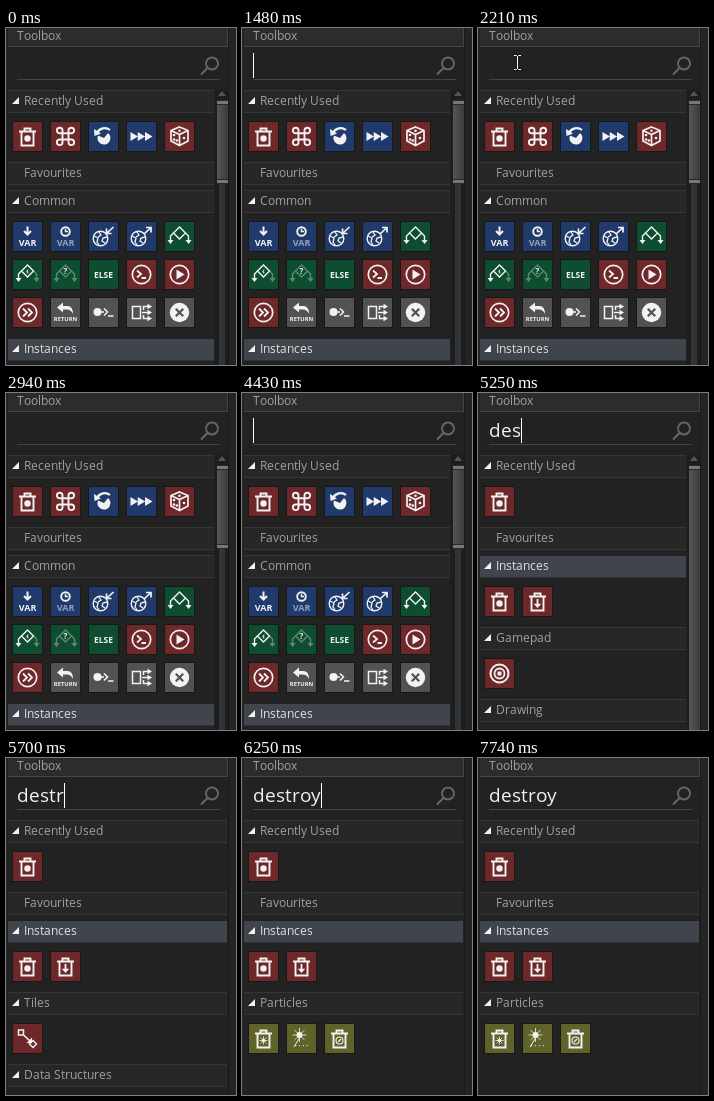
These frames come from a looping animation (230x337 px, 8000 ms). An HTML page with a canvas:

```html
<!DOCTYPE html>
<html lang="en">
<head>
<meta charset="utf-8">
<title>Toolbox search</title>
<style>
html, body { margin: 0; width: 230px; height: 337px; overflow: hidden; background: #222; }
canvas { display: block; }
</style>
</head>
<body>
<canvas id="stage" width="230" height="337"></canvas>
<script>
const ctx = document.getElementById('stage').getContext('2d');
const LOOP = 8000;
const FONT = '"Open Sans", "Noto Sans", sans-serif';
const RED = '#6e2829', BLUE = '#203b6b', GREEN = '#0f4d31', GREY = '#525252', OLIVE = '#606329';
const WHITE = '#f2f2f2';

function rect(x, y, w, h, color) {
  ctx.fillStyle = color;
  ctx.fillRect(x, y, w, h);
}
function stroke(d, width = 1.6, color = WHITE) {
  ctx.strokeStyle = color;
  ctx.lineWidth = width;
  ctx.stroke(new Path2D(d));
}
function fill(d, color = WHITE) {
  ctx.fillStyle = color;
  ctx.fill(new Path2D(d));
}
function disc(x, y, r, color = WHITE) {
  ctx.beginPath();
  ctx.arc(x, y, r, 0, Math.PI * 2);
  ctx.fillStyle = color;
  ctx.fill();
}
function ring(x, y, r, width = 1.6, color = WHITE) {
  ctx.beginPath();
  ctx.arc(x, y, r, 0, Math.PI * 2);
  ctx.strokeStyle = color;
  ctx.lineWidth = width;
  ctx.stroke();
}
// Glyphs advance by whole pixels; returns the pen position after the text.
function text(str, x, y, size, color) {
  ctx.font = `${size}px ${FONT}`;
  ctx.textAlign = 'left';
  ctx.fillStyle = color;
  for (const char of str) {
    ctx.fillText(char, x, y);
    x += Math.round(ctx.measureText(char).width);
  }
  return x;
}
function label(str, y, size = 9, color = WHITE) {
  ctx.font = `700 ${size}px ${FONT}`;
  ctx.textAlign = 'center';
  ctx.fillStyle = color;
  ctx.fillText(str, 15.5, y);
}

function bin() {
  stroke('M7 10.5H24M12.5 10V7.5H18.5V10M9.5 11V24.5H21.5V11', 1.9);
}
function globe() {
  ring(12.5, 17.5, 7.3, 1.4);
  stroke('M6 15L10 17L9 21L11 24M11 11L13 14L10 16M19 16L15 17L14 20L17 22', 1.3);
}
function burst(x, y, r) {
  disc(x, y, r * 0.42);
  for (let i = 0; i < 8; i++) {
    const a = i * Math.PI / 4, c = Math.cos(a) * r, s = Math.sin(a) * r;
    stroke(`M${x} ${y}L${x + c} ${y + s}`, 0.8);
  }
}
function branch(dimLeft, dimRight, mark) {
  const dim = '#5d8a73';
  const left = dimLeft ? dim : WHITE, right = dimRight ? dim : WHITE;
  stroke('M9.5 12L6.5 15V20', 1.4, left);
  fill('M3.5 19H9.5L6.5 23Z', left);
  stroke('M21.5 12L24.5 15V20', 1.4, right);
  fill('M21.5 19H27.5L24.5 23Z', right);
  stroke('M15.5 6L21.5 12L15.5 18L9.5 12Z', 1.4, left);
  if (mark) label(mark, 15.2, 8);
}
function circled(d) {
  ring(15.5, 15.5, 9.2, 1.7);
  stroke(d, 1.8);
}

const icons = {
  destroy: [RED, () => { bin(); disc(15.5, 17.5, 3.2); }],
  destroyAt: [RED, () => { bin(); stroke('M15.5 13V19', 1.8); fill('M11.8 17.7H19.2L15.5 22Z'); }],
  loop: [RED, () => stroke('M12.5 9.5A2.8 2.8 0 1 0 9.7 12.3H21.3A2.8 2.8 0 1 0 18.5 9.5V21.3A2.8 2.8 0 1 0 21.3 18.5H9.7A2.8 2.8 0 1 0 12.5 21.3Z', 1.9)],
  rotate: [BLUE, () => {
    fill('M16 17L10 14.5A6.5 6.5 0 1 0 20 12Z');
    stroke('M9 12A8.5 8.5 0 0 1 22 9', 2.2);
    fill('M6 8L13 12.5L6.5 15Z');
  }],
  speed: [BLUE, () => [4.5, 11.7, 19].forEach(x => fill(`M${x} 11L${x + 7.5} 15.5L${x} 20Z`))],
  dice: [RED, () => {
    stroke('M15.5 6L24 9.5V20L15.5 24.5L7 20V9.5ZM7 9.5L15.5 13.5L24 9.5M15.5 13.5V24.5', 1.7);
    [[15.5, 9.8], [10, 14], [12.8, 19.5], [10, 18.5], [20, 17]].forEach(p => disc(p[0], p[1], 1.3));
  }],
  assign: [BLUE, () => {
    stroke('M15.5 5.5V13M12 10L15.5 13.5L19 10', 2);
    label('VAR', 25);
  }],
  temp: [BLUE, () => { ring(15.5, 10.5, 4.3, 1.9); stroke('M15.5 8V10.5H18', 1.4); label('VAR', 25, 9, '#94a2ba'); }],
  globeIn: [BLUE, () => { globe(); stroke('M25.5 6L19 12M18.5 7.5V12.5H23.5', 1.7); }],
  globeOut: [BLUE, () => { globe(); stroke('M18 13L25 6.5M20 6.5H25V11.5', 1.7); }],
  branch: [GREEN, () => branch()],
  branchVar: [GREEN, () => branch(false, true, '‹')],
  branchAsk: [GREEN, () => branch(true, true, '?')],
  otherwise: [GREEN, () => label('ELSE', 18.8, 8.5)],
  run: [RED, () => circled('M11 11.5L15 15L11 18.5M15.5 19H20')],
  play: [RED, () => { circled(''); fill('M12.5 10.5L20.5 15.5L12.5 20.5Z'); }],
  forward: [RED, () => circled('M11 11.5L15 15.5L11 19.5M16 11.5L20 15.5L16 19.5')],
  back: [GREY, () => {
    fill('M7 10.5L13 5.5V9H18Q23 9.5 23 17Q21 12.5 17 12.5H13V15.5Z');
    label('RETURN', 24, 5.8);
  }],
  script: [GREY, () => { disc(9.5, 15, 4); stroke('M13 15H16M16 11.5L19.5 15L16 18.5M20 19H25.5', 1.6); }],
  split: [GREY, () => {
    stroke('M6.5 9.5H14.5V21.5H6.5ZM16 15.5H22M17.5 13V9.5H22M17.5 18V21.5H22', 1.5);
    [9.5, 15.5, 21.5].forEach(y => fill(`M21.5 ${y - 2.8}L26 ${y}L21.5 ${y + 2.8}Z`));
  }],
  exit: [GREY, () => { disc(15.5, 15.5, 9.7); stroke('M11.8 11.8L19.2 19.2M19.2 11.8L11.8 19.2', 2.2, GREY); }],
  pad: [RED, () => { ring(15.5, 15.5, 9, 2); ring(15.5, 15.5, 5, 1.8); rect(13.5, 13.5, 4, 4, WHITE); }],
  tiles: [RED, () => {
    stroke('M6.5 7H11.5V12H6.5ZM11.5 12L18 18', 1.5);
    fill('M20 14.5V20H14.5Z');
    stroke('M21 17.5L24.5 21L21 24.5L17.5 21Z', 1.4);
  }],
  binBurst: [OLIVE, () => { bin(); burst(15.5, 17.5, 4); }],
  burst: [OLIVE, () => { burst(13.5, 12, 7); stroke('M13.5 15L8 24', 1); label('· · · ·', 25, 7); }],
  binSwirl: [OLIVE, () => { bin(); ring(15.5, 17.5, 3.5, 1.1); stroke('M14 19L17 16', 1.2); }]
};

const recent = ['Recently Used', 'destroy'];
const instances = ['Instances', 'destroy destroyAt'];
const common = ['Common', 'temp'];
const favourites = ['Favourites', ''];

// Each view: the scroll thumb's lower end (0 = no scrollbar), then its sections.
const views = {
  all: [156, ['Recently Used', 'destroy loop rotate speed dice'], favourites,
    ['Common', 'assign temp globeIn globeOut branch branchVar branchAsk otherwise run play forward back script split exit'], instances],
  d: [247, recent, favourites, common, instances, ['Mouse & Keyboard', 'loop']],
  de: [345, recent, favourites, common, instances, ['Gamepad', 'pad']],
  des: [345, recent, favourites, instances, ['Gamepad', 'pad'], ['Drawing', 'pad']],
  dest: [0, recent, favourites, instances, ['Tiles', 'tiles'], ['Data Structures', 'destroy']],
  destro: [0, recent, favourites, instances, ['Particles', 'binBurst burst binSwirl']]
};

const typed = [
  [0, '', 'all'], [4890, 'd', 'd'], [5070, 'de', 'de'], [5250, 'des', 'des'],
  [5520, 'dest', 'dest'], [5700, 'destr', 'dest'], [5980, 'destro', 'destro'], [6250, 'destroy', 'destro']
];
const caretFlips = [560, 1020, 1480, 1940, 2490, 2940, 3500, 3960, 4430, 6810, 7280, 7740];
const pointer = [
  [2030, 45, 98, 'arrow'], [2120, 41, 58, 'beam'], [2210, 39, 34, 'beam'], [2670, 62, 35, 'beam'],
  [2760, 128, 31, 'beam'], [2850, 208, 26, 'beam'], [2940, 0, 0, '']
];
const latest = (steps, t) => steps.filter(s => s[0] <= t).pop();

function drawIcon(name, x, y) {
  const [color, paint] = icons[name];
  ctx.save();
  ctx.translate(x, y);
  rect(0, 0, 31, 31, '#181818');
  rect(1, 1, 29, 29, color);
  paint();
  ctx.restore();
}

function drawHeader(title, y, width) {
  const selected = title === 'Instances';
  rect(2, y, width, 23, selected ? '#40444d' : '#272727');
  rect(2, y, width, 1, selected ? '#222' : '#363636');
  rect(2, y + 22, width, 1, selected ? '#30343a' : '#363636');
  if (title !== 'Favourites') fill(`M13 ${y + 7}V${y + 14}H6Z`);
  text(title, 18, y + 15, 12, selected ? '#e0e0e0' : '#a0a0a0');
}

function drawScrollbar(end) {
  rect(209, 62, 13, 275, '#1d1d1d');
  rect(213, 72, 6, 265, '#30353a');
  fill('M212 68L216 63L220 68Z', '#555');
  const shade = ctx.createLinearGradient(211, 0, 222, 0);
  shade.addColorStop(0, '#555');
  shade.addColorStop(1, '#3c3c3c');
  rect(211, 72, 11, end - 72, shade);
  for (const y of [72, end - 5]) {
    rect(211, y, 11, 5, '#282828');
    rect(211, y + 1, 11, 3, '#777');
  }
}

function drawPanel([end, ...sections]) {
  rect(0, 0, 230, 337, '#242424');
  rect(2, 0, 220, 337, '#222');
  rect(2, 0, 220, 19, '#454545');
  rect(2, 0, 219, 18, '#2c2c2c');
  text('Toolbox', 11, 12, 12, '#a0a0a0');
  rect(11, 51, 203, 1, '#444');
  ring(206, 35.5, 6, 1.8, '#686868');
  stroke('M201.5 40L195 46.5', 2, '#686868');

  let y = 62;
  for (const [title, list] of sections) {
    drawHeader(title, y, end ? 206 : 219);
    const names = list ? list.split(' ') : [];
    names.forEach((name, i) => drawIcon(name, 6 + i % 5 * 38, y + 31 + Math.floor(i / 5) * 38));
    y += names.length ? 34 + Math.ceil(names.length / 5) * 38 : 28;
  }
  if (end) drawScrollbar(end);
  rect(222, 0, 1, 337, '#181818');
}

function drawPointer(x, y, kind) {
  if (kind === 'arrow') {
    const d = `M${x} ${y}v16l4-4l3 7l2-1l-3-6h5Z`;
    fill(d, '#fff');
    stroke(d, 1, '#000');
  } else if (kind === 'beam') {
    const d = `M${x - 3} ${y - 6.5}h2.5l1 1l1-1h2.5M${x + 0.5} ${y - 6}v13M${x - 3} ${y + 7.5}h2.5l1-1l1 1h2.5`;
    stroke(d, 2.6, '#111');
    stroke(d, 1, '#fff');
  }
}

function draw(now) {
  const t = now % LOOP;
  const [, query, view] = latest(typed, t);
  drawPanel(views[view]);
  const caretX = text(query, 11, 44, 19, '#f0f0f0');
  const caretOn = caretFlips.filter(f => f <= t).length % 2 === 1;
  if (caretOn) rect(caretX, 25, 1, 25, '#fff');
  const spot = latest(pointer, t);
  if (spot) drawPointer(spot[1], spot[2], spot[3]);
}

const start = performance.now();
function tick() {
  draw(performance.now() - start);
  requestAnimationFrame(tick);
}
tick();
</script>
</body>
</html>
```
